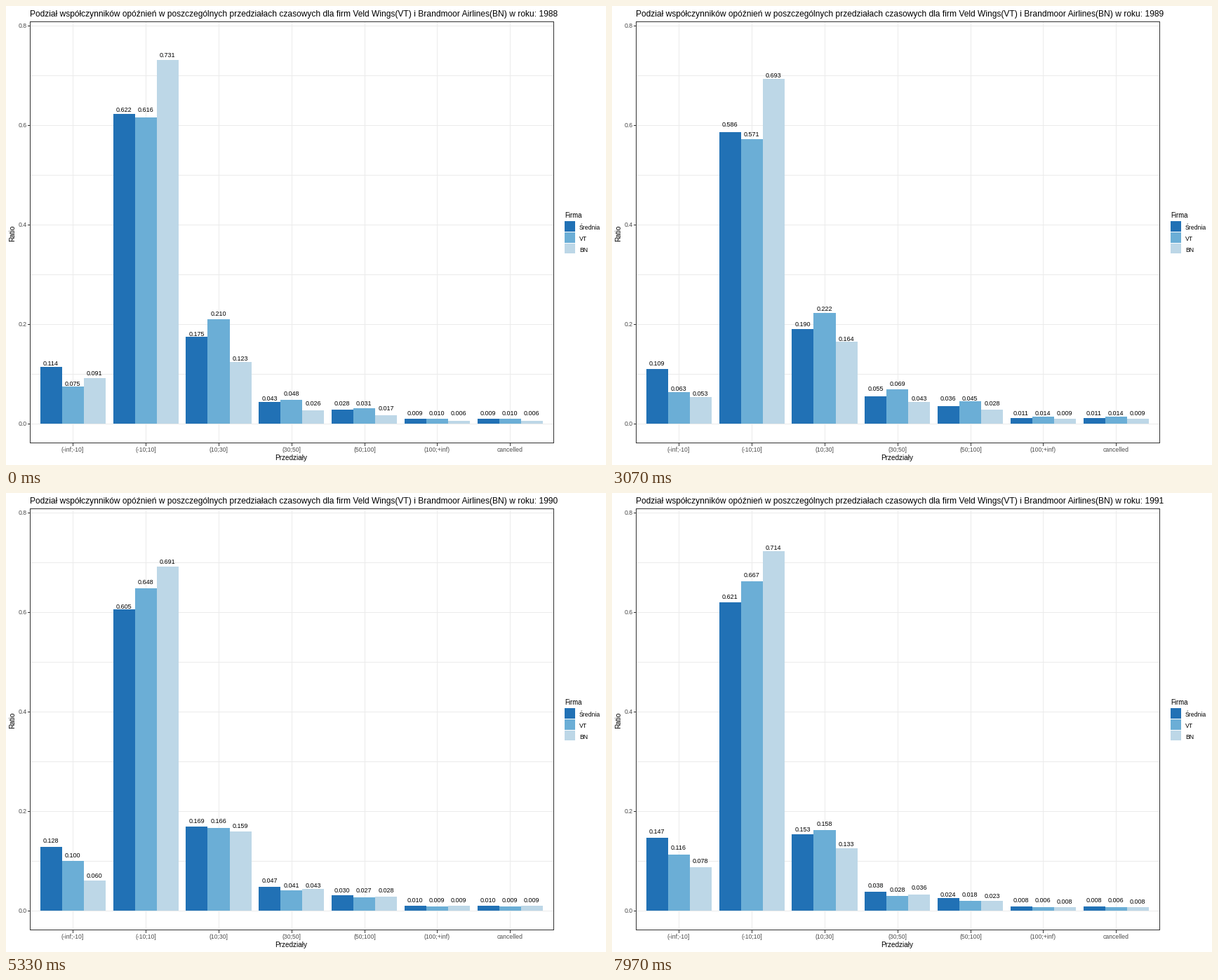
These frames come from a looping animation (855 px wide and 655 px high, 8 s). A matplotlib script:

```python
import math

import matplotlib.pyplot as plt
from matplotlib.animation import FuncAnimation
from matplotlib.patches import Rectangle

W, H, DPI = 855, 655, 64
PX = 72 / DPI                      # points per pixel
LOOP, INTERVAL, STEPS = 8000, 25, 240
PERIOD, MOVE, FIRST = 68, 45, 22   # all in steps

plt.rcParams["font.family"] = "Liberation Sans"

COLORS = ["#2171B5", "#6BAED6", "#BDD7E7"]
FIRMS = ["Średnia", "VT", "BN"]
BINS = ["(-inf;-10]", "(-10;10]", "(10;30]", "(30;50]", "(50;100]",
        "(100;+inf)", "cancelled"]
TITLE = ("Podział współczynników opóźnień w poszczególnych przedziałach "
         "czasowych dla firm Veld Wings(VT) i Brandmoor Airlines(BN) "
         "w roku: {}")

# Shares of the first three bins, per firm
HEADS = {
    1988: [(.114, .622, .1748), (.0748, .616, .210), (.091, .731, .123)],
    1989: [(.109, .586, .190), (.063, .571, .222), (.053, .693, .164)],
    1990: [(.128, .6048, .169), (.100, .648, .166), (.060, .691, .159)],
    1991: [(.147, .621, .153), (.116, .667, .158), (.078, .714, .133)],
}
TAIL = (.48, .31, .10, .10)        # how the later bins split the rest
DRIFT = (1.03, 1.16, .65)          # growth per bin into the last year

LEFT, RIGHT, TOP, BOTTOM = 34, 780, 22, 623
ZERO, UNIT = 596.3, 709.8
BAR_X, BIN_STEP, BAR_W = 49.25, 103.8, 31.1


def fill_tail(head):
    rest = 1 - sum(head)
    return [*head, *(rest * part for part in TAIL)]


def drifted(shares, growth):
    grown = [s * growth ** i for i, s in enumerate(shares)]
    return [g / sum(grown) for g in grown]


ratios = {year: [fill_tail(head) for head in heads]
          for year, heads in HEADS.items()}
ratios[1992] = [drifted(s, g) for s, g in zip(ratios[1991], DRIFT)]


def y_of(ratio):
    return ZERO - ratio * UNIT


def mix(a, b, p):
    return a + (b - a) * p


fig = plt.figure(figsize=(W / DPI, H / DPI), dpi=DPI, facecolor="white")
ax = fig.add_axes([0, 0, 1, 1])
ax.set_xlim(0, W)
ax.set_ylim(H, 0)
ax.axis("off")


def line(x0, y0, x1, y1, color, z):
    ax.plot([x0, x1], [y0, y1], color=color, lw=PX, antialiased=False,
            solid_capstyle="butt", zorder=z)


def text(x, y, s, size, color="black", ha="left", va="baseline", **kw):
    return ax.text(x, y, s, fontsize=size * PX, color=color, ha=ha, va=va,
                   zorder=5, **kw)


def box(x, y, w, h, color):
    return ax.add_patch(Rectangle((x, y), w, h, facecolor=color, lw=0,
                                  snap=True, zorder=2))


# Grid, ticks and axis labels
for n in range(9):
    y = int(y_of(n / 10))
    line(LEFT, y, RIGHT, y, "#EBEBEB", 1)
    if n % 2 == 0:
        line(LEFT - 3, y, LEFT, y, "#333333", 3)
        text(30, y + 3, f"{n / 10:.1f}", 8.8, "#4D4D4D", "right")
for i, name in enumerate(BINS):
    x = int(BAR_X + 1.5 * BAR_W + i * BIN_STEP)
    line(x, TOP, x, BOTTOM, "#EBEBEB", 1)
    line(x, BOTTOM + 1, x, BOTTOM + 4, "#333333", 3)
    text(x, 636, name, 8.6, "#4D4D4D", "center")
ax.add_patch(Rectangle((LEFT, TOP), RIGHT - LEFT, BOTTOM - TOP, fill=False,
                       edgecolor="#333333", lw=PX, antialiased=False,
                       snap=True, zorder=4))
text(406.5, 648.5, "Przedziały", 10, ha="center")
text(14, 324, "Ratio", 10, ha="right", va="center", rotation=90)

# Legend
text(796, 302, "Firma", 9.6)
for j, (firm, color) in enumerate(zip(FIRMS, COLORS)):
    box(796, 307.4 + 15.6 * j, 14.6, 14.6, color)
    text(817, 319.4 + 15.6 * j, firm, 8.6)

title = text(34, 15, "", 12)
bars, labels = [], []
for j, color in enumerate(COLORS):
    for i in range(len(BINS)):
        x = BAR_X + i * BIN_STEP + j * BAR_W
        left, right = int(x), int(x + BAR_W)
        bars.append(box(left, int(ZERO), right - left, 0, color))
        labels.append(text(x + BAR_W / 2 - .8, ZERO, "", 9, ha="center"))


def state(step):
    """Start year and progress (0 to 1) of the move to the next year."""
    n, k = divmod(step - FIRST, PERIOD)
    if n < 0:
        return 1988, 0
    return 1988 + n, min(k / MOVE, 1)


def update(frame):
    step = (frame * INTERVAL + 17) * STEPS // LOOP
    year, t = state(step)
    p = (1 - math.cos(math.pi * t)) / 2
    now, then = sum(ratios[year], []), sum(ratios[year + 1], [])
    shown = then if t >= .5 else now
    title.set_text(TITLE.format(year + (t >= .5)))
    for bar, label, a, b, v in zip(bars, labels, now, then, shown):
        top = int(y_of(mix(a, b, p)))
        bar.set_y(top)
        bar.set_height(int(ZERO) - top)
        # Labels ride on ratios rounded to two places
        label.set_y(y_of(mix(round(a, 2), round(b, 2), p)) - 5)
        label.set_text(f"{v:.3f}")
    return [title, *bars, *labels]


anim = FuncAnimation(fig, update, frames=LOOP // INTERVAL, interval=INTERVAL,
                     init_func=lambda: update(0), repeat=True,
                     repeat_delay=0, blit=False)
plt.show()
```
